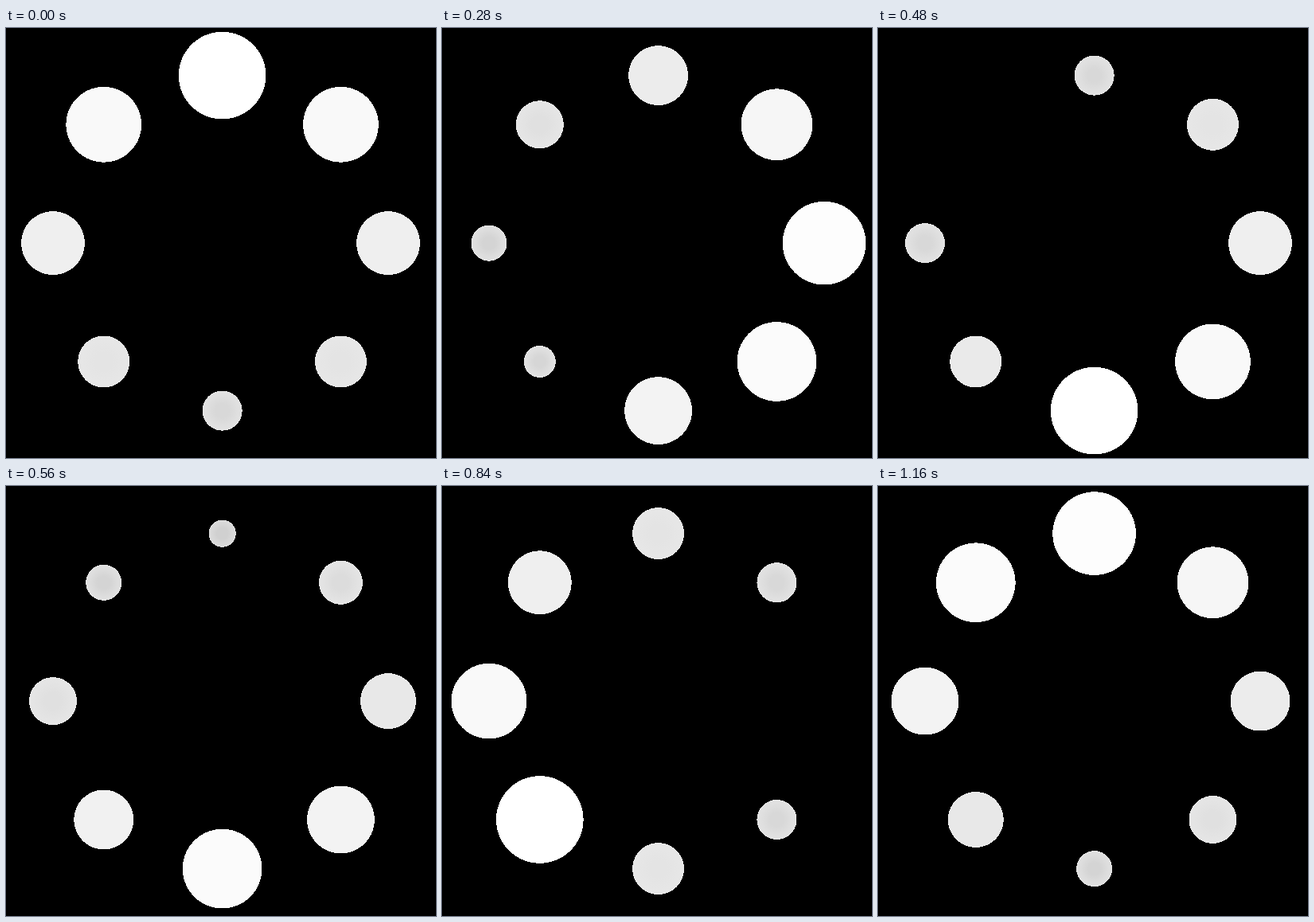
An HTML page with a canvas that plays this animation: 540x540 px, repeating every 1200 ms.

```html
<!DOCTYPE html>
<html lang="en">
<head>
<meta charset="utf-8">
<title>Dot spinner</title>
<style>
  html, body { margin: 0; width: 100%; height: 100%; overflow: hidden; background: #000; }
  canvas { display: block; }
</style>
</head>
<body>
<canvas id="stage" width="540" height="540"></canvas>
<script>
const ctx = document.getElementById('stage').getContext('2d');
const SIZE = 540, COUNT = 8, RING = 210.5;
const STEP = 40, STEPS = 30, HALF = STEPS / 2;
const LAG = 3, PAUSE = 6, PAUSE_AT = 5;

const grey = v => {
  const n = Math.round(Math.min(255, v));
  return `rgb(${n},${n},${n})`;
};

// Disc with hard pixel edges
function disc(x, y, r) {
  for (let row = Math.floor(y - r); row <= y + r; row++) {
    const dy = row + 0.5 - y;
    if (Math.abs(dy) >= r) continue;
    const w = Math.sqrt(r * r - dy * dy);
    const left = Math.round(x - w);
    ctx.fillRect(left, row, Math.round(x + w) - left, 1);
  }
}

function place(i) {
  const angle = i * 2 * Math.PI / COUNT;
  // The left and right dots sit slightly off the ring's axis
  const axis = i % 4 === 2 ? 269.5 : 271.6;
  return [axis + RING * Math.sin(angle), 270.1 - RING * Math.cos(angle)];
}

function drawDot(i, step) {
  const [x, y] = place(i);
  const peak = i * LAG + (i >= PAUSE_AT ? PAUSE : 0);
  const phase = (step - peak + STEPS) % STEPS;
  const level = Math.abs(HALF - phase);

  // The dot that follows the pause fades in brighter
  const boost = i === PAUSE_AT && phase >= HALF ? 1.5 : 0;
  const light = Math.min(HALF, level + boost);
  if (light < 1) return;

  const full = (35 + 4.97 * level) / 2;
  const r = light < 2 ? full * 0.855 : full;
  const core = 255 - 6.4 * Math.pow((HALF - light) / 3, 1.3);
  const rim = core + Math.max(0, 7 - light) * 2.8;

  const fill = ctx.createRadialGradient(x, y, full * 0.35, x, y, full);
  fill.addColorStop(0, grey(core));
  fill.addColorStop(1, grey(rim));
  ctx.fillStyle = fill;
  disc(x, y, r);
}

function draw(now) {
  const step = Math.floor(now / STEP) % STEPS;
  ctx.fillStyle = '#000';
  ctx.fillRect(0, 0, SIZE, SIZE);
  for (let i = 0; i < COUNT; i++) drawDot(i, step);
}

function tick() {
  draw(performance.now());
  requestAnimationFrame(tick);
}
tick();
</script>
</body>
</html>
```
